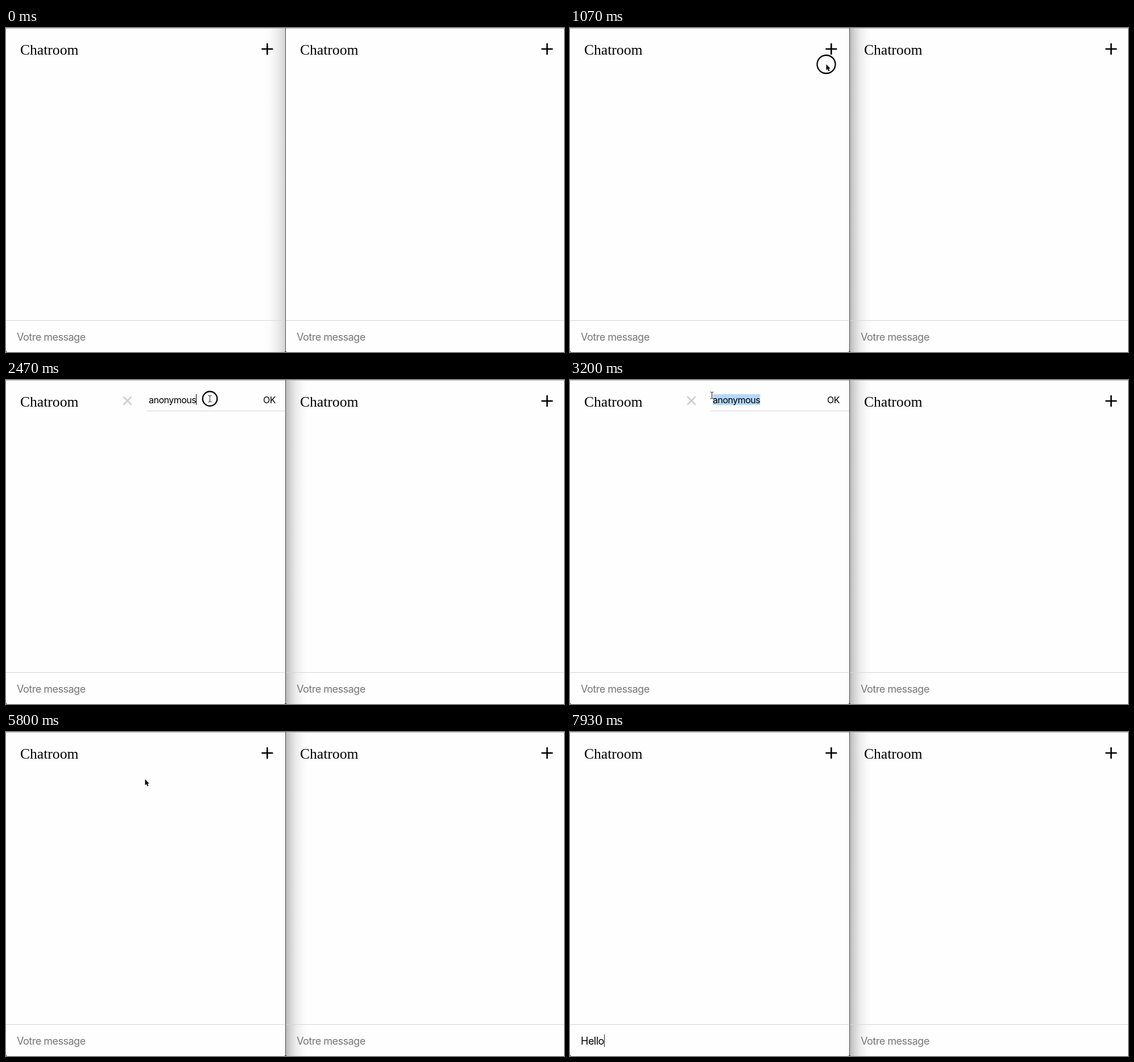
An HTML page with a canvas for the animation above (8000 ms loop, 981 by 571 pixels).

```html
<!DOCTYPE html>
<html lang="fr">
<head>
<meta charset="utf-8">
<title>Chatroom</title>
<style>
html, body { margin: 0; width: 100%; height: 100%; overflow: hidden; background: #fefefe; }
canvas { display: block; }
</style>
</head>
<body>
<canvas id="stage" width="981" height="571"></canvas>
<script>
const ctx = document.getElementById('stage').getContext('2d');
const LOOP = 8000, SPLIT = 491;
const SANS = 'Inter, "Liberation Sans", sans-serif';
const SERIF = '"Liberation Serif", "Times New Roman", serif';

const FOCUS = 1000, OPEN = 2000, CLOSE = 5000;
const CLICKS = [960, 1920, 2450, 6320];
const NICK = 'corvenal', NICK_KEYS = [3470, 3670, 3930, 4070, 4270, 4470, 4600, 4720];
const HELLO = 'Hello', HELLO_KEYS = [7270, 7470, 7600, 7730, 7900];

// Pointer path: time, x, y
const PATH = [
  [400, 472, 2], [900, 450, 64], [1200, 450, 64], [1600, 458, 38], [2070, 458, 38],
  [2270, 358, 33], [2500, 358, 33], [3150, 249, 27], [5700, 249, 42],
  [6270, 189, 540], [6540, 189, 540], [6600, 187, 538]
];

const between = (t, a, b) => t >= a && t < b;
const clamp = v => Math.max(0, Math.min(1, v));
const typed = (word, keys, t) => word.slice(0, keys.filter(k => t >= k).length);

function pointerAt(t) {
  const i = PATH.findIndex(p => p[0] > t);
  if (i === 0) return PATH[0].slice(1);
  if (i < 0) return PATH[PATH.length - 1].slice(1);
  const [t0, x0, y0] = PATH[i - 1], [t1, x1, y1] = PATH[i];
  const u = (t - t0) / (t1 - t0), e = u * u * (3 - 2 * u);
  return [x0 + (x1 - x0) * e, y0 + (y1 - y0) * e];
}

function rect(x, y, w, h, color) {
  ctx.fillStyle = color;
  ctx.fillRect(x, y, w, h);
}

function setFont(size, family = SANS, spacing = -0.5) {
  ctx.font = `${size}px ${family}`;
  ctx.letterSpacing = spacing + 'px';
}

function text(str, x, y, color = '#000') {
  ctx.fillStyle = color;
  ctx.fillText(str, x, y);
  return x + ctx.measureText(str).width;
}

function plus(x, y, color, angle = 0) {
  ctx.save();
  ctx.translate(x, y);
  ctx.rotate(angle);
  rect(-10, -1.3, 20, 2.6, color);
  rect(-1.3, -10, 2.6, 20, color);
  ctx.restore();
}

function shadow(from, to, alpha) {
  const g = ctx.createLinearGradient(from, 0, to, 0);
  [1, 0.55, 0.25, 0.08, 0].forEach((a, i) =>
    g.addColorStop(i / 4, `rgba(0,0,0,${a * alpha})`));
  rect(Math.min(from, to), 1, Math.abs(to - from), 570, g);
}

function panel(x, message, formOpen) {
  setFont(25.6, SERIF, 0);
  text('Chatroom', x + 25, 47);
  if (!formOpen) plus(x + 459.3, 37, '#000');
  rect(x, 515, 490, 1, '#d6d6d6');
  setFont(18);
  return text(message || 'Votre message', x + 19, 551, message ? '#000' : '#757575');
}

function nickForm(t, mouseX) {
  plus(213.5, 36.5, '#ccc', Math.PI / 4);
  rect(247, 54, 244, 1, '#d6d6d6');
  setFont(16);
  text('OK', 452, 41);
  const left = 251, selecting = between(t, 2500, NICK_KEYS[0]);
  const value = t < NICK_KEYS[0] ? 'anonymous' : typed(NICK, NICK_KEYS, t);
  if (selecting) {
    const width = n => ctx.measureText(value.slice(0, n)).width;
    let n = 0;
    while (n < value.length && left + (width(n) + width(n + 1)) / 2 < mouseX) n++;
    rect(left + width(n), 25, width(value.length) - width(n), 19, '#b4d8fd');
  }
  const end = text(value, left, 41);
  if (!selecting && t >= 2450) rect(Math.round(end), 25, 1, 19, '#000');
}

function arrow(x, y) {
  ctx.beginPath();
  [[0, 0], [0, 10.5], [2.4, 8.3], [4.2, 12.2], [6, 11.4], [4.3, 7.6], [7.4, 7.6]]
    .forEach(([dx, dy]) => ctx.lineTo(x + dx, y + dy));
  ctx.closePath();
  ctx.lineWidth = 1.2;
  ctx.strokeStyle = '#fff';
  ctx.stroke();
  ctx.fillStyle = '#000';
  ctx.fill();
}

function beam(x, y) {
  ctx.beginPath();
  for (const s of [-1, 1]) {
    ctx.moveTo(x - 3, y + 6 * s);
    ctx.quadraticCurveTo(x, y + 6 * s, x, y + 4 * s);
    ctx.quadraticCurveTo(x, y + 6 * s, x + 3, y + 6 * s);
  }
  ctx.moveTo(x, y - 5);
  ctx.lineTo(x, y + 5);
  ctx.lineWidth = 1;
  ctx.strokeStyle = '#222';
  ctx.stroke();
}

function pointer(t, x, y, formOpen) {
  for (const start of CLICKS) {
    const age = t - start;
    if (!between(age, 0, 260)) continue;
    ctx.globalAlpha = 1 - clamp((age - 120) / 140);
    ctx.beginPath();
    ctx.arc(x + 0.5, y, 12 + 4 * clamp(age / 110), 0, 7);
    ctx.lineWidth = 2.3;
    ctx.strokeStyle = '#000';
    ctx.stroke();
    ctx.globalAlpha = 1;
  }
  if (y > 515 || formOpen && x > 246 && x < 445 && y < 54) beam(x + 0.5, y);
  else arrow(x + 0.5, y);
}

function draw(t) {
  const formOpen = between(t, OPEN, CLOSE);
  const [x, y] = pointerAt(t);
  rect(0, 0, 981, 571, '#fefefe');
  if (t < FOCUS) shadow(SPLIT, SPLIT - 38, 0.17);
  else shadow(SPLIT + 1, SPLIT + 39, 0.27);

  const hello = typed(HELLO, HELLO_KEYS, t);
  const end = panel(0, hello, formOpen);
  panel(492, '', false);
  if (formOpen) nickForm(t, x);
  if (hello || between(t, 6390, 6890)) rect(hello ? Math.round(end) : 19, 533, 1, 22, '#222');

  rect(0, 0, 981, 1, '#b4b4b4');
  rect(SPLIT, 0, 1, 571, '#4a4a4a');
  rect(0, 569, 1, 2, '#444');
  rect(SPLIT - 1, 570, 3, 1, '#333');
  if (between(t, 400, NICK_KEYS[0]) || between(t, 5730, HELLO_KEYS[0])) pointer(t, x, y, formOpen);
}

const began = performance.now();
function frame() {
  draw((performance.now() - began) % LOOP);
  requestAnimationFrame(frame);
}
frame();
</script>
</body>
</html>
```
